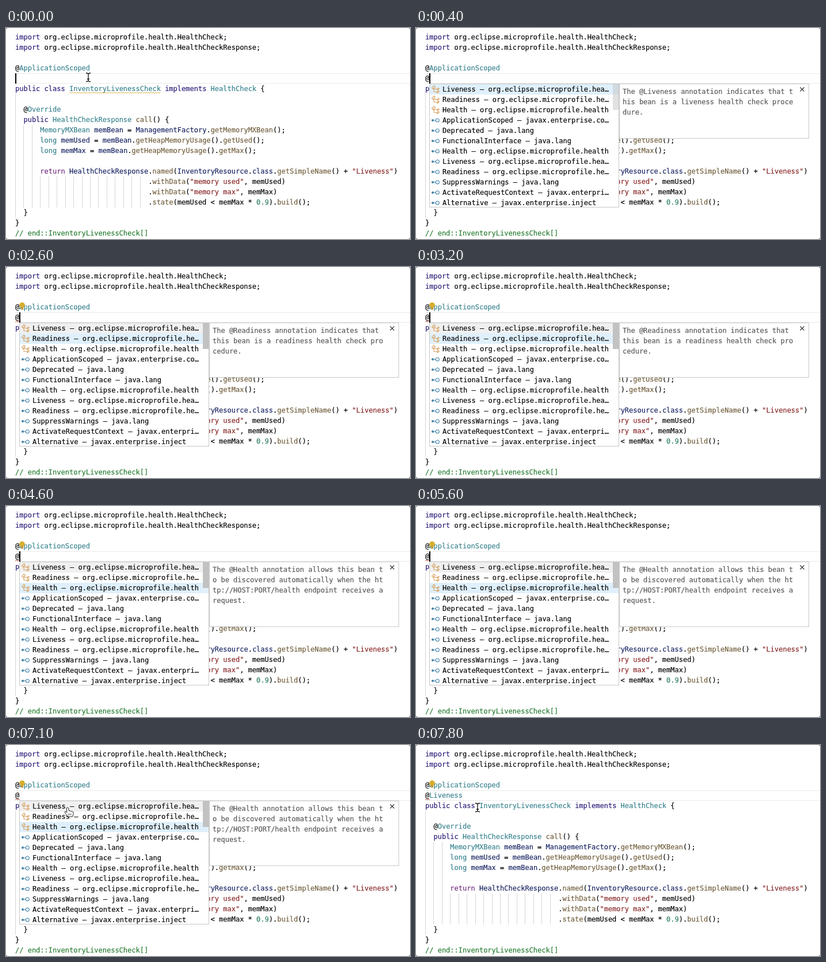
Recreate the animation shown at these times as an HTML page. Size 702 by 368 pixels, loop 7.9 s.

```html
<!DOCTYPE html>
<html lang="en">
<head>
<meta charset="utf-8">
<title>Code completion</title>
<style>
html, body { margin: 0; width: 100%; height: 100%; overflow: hidden; }
html { background: #444; }
body { position: relative; background: #fff; border-radius: 3px; color: #000;
  font: 12px/18px "DejaVu Sans Mono", "Liberation Mono", monospace; -webkit-text-stroke: .15px; }
body > *, #scroll, #close { position: absolute; }
pre { margin: 0; font: inherit; }
svg { overflow: visible; }
path, circle { fill: none; }
#line { left: 16px; right: 0; top: 79px; height: 18px; box-sizing: border-box; border: solid #e9e9e9; border-width: 1px 0; }
#code { left: 16px; top: 7px; }
#marks { left: 0; top: 0; width: 702px; height: 368px; }
#caret { top: 79px; width: 2px; height: 18px; background: #000; }
.k { color: #251a76; } .r { color: #70297f; } .t { color: #35808c; } .v { color: #14205f; }
.m { color: #6e5b38; } .s { color: #862222; } .n { color: #2f7f68; } .c { color: #217a2c; }
.box { background: #fff; border: 1px solid #c8c8c8; box-sizing: border-box; overflow: hidden; width: 330px; top: 97px; }
#list { left: 23px; height: 216px; }
#list pre { height: 18px; padding-left: 22px; position: relative; }
#list svg { position: absolute; left: 2px; top: 1px; }
#list .hover { background: #f0f0f0; }
#list .on { background: #dff0fc; }
#scroll { right: 0; top: 0; width: 10px; height: 45px; background: #c2c2c2; }
#doc { left: 353px; color: #555; }
#doc pre { margin: 4px 5px; }
#close { left: 313px; top: 5px; }
</style>
</head>
<body>
<div id="line"></div>
<pre id="code"><span class="k">import</span> org.eclipse.microprofile.health.HealthCheck;
<span class="k">import</span> org.eclipse.microprofile.health.HealthCheckResponse;

@<span class="t">ApplicationScoped</span>
<span id="typed"></span>
<span class="k">public class</span> <span class="t">InventoryLivenessCheck</span> <span class="k">implements</span> <span class="t">HealthCheck</span> {

  @<span class="t">Override</span>
  <span class="k">public</span> <span class="t">HealthCheckResponse</span> <span class="m">call</span>() {
      <span class="t">MemoryMXBean</span> <span class="v">memBean</span> = <span class="v">ManagementFactory</span>.<span class="m">getMemoryMXBean</span>();
      <span class="t">long</span> <span class="v">memUsed</span> = <span class="v">memBean</span>.<span class="m">getHeapMemoryUsage</span>().<span class="m">getUsed</span>();
      <span class="t">long</span> <span class="v">memMax</span> = <span class="v">memBean</span>.<span class="m">getHeapMemoryUsage</span>().<span class="m">getMax</span>();

      <span class="r">return</span> <span class="v">HealthCheckResponse</span>.<span class="m">named</span>(<span class="v">InventoryResource</span>.<span class="v">class</span>.<span class="m">getSimpleName</span>() + <span class="s">"Liveness"</span>)
                                .<span class="m">withData</span>(<span class="s">"memory used"</span>, memUsed)
                                .<span class="m">withData</span>(<span class="s">"memory max"</span>, memMax)
                                .<span class="m">state</span>(memUsed &lt; memMax * <span class="n">0.9</span>).<span class="m">build</span>();
  }
}
<span class="c">// end::InventoryLivenessCheck[]</span></pre>
<svg id="marks">
  <path id="guides" stroke="#d6d6d6"/>
  <path id="warning" stroke="#d9b04c"/>
  <path id="error" stroke="#cf5a52"/>
  <g id="bulb">
    <circle cx="28" cy="66.5" r="4.8" style="fill:#d8ae2e"/>
    <path d="M26 70h4v4.500h-4z" style="fill:#c09a3a"/>
  </g>
</svg>
<div id="caret"></div>
<div id="list" class="box"><div id="scroll"></div></div>
<div id="doc" class="box">
  <pre id="docText"></pre>
  <svg id="close" width="8" height="8"><path d="M.5 .5l7 7m0-7l-7 7" stroke="#333" stroke-width="1.2"/></svg>
</div>
<svg id="mouse" width="1" height="1" style="left:0;top:0">
  <g id="beam">
    <path d="M-4-7.500q4 0 4 2.500v10q0 2.500-4 2.500M4-7.500q-4 0-4 2.500m0 10q0 2.500 4 2.500" stroke="#fff" stroke-width="3"/>
    <path d="M-4-7.500q4 0 4 2.500v10q0 2.500-4 2.500M4-7.500q-4 0-4 2.500m0 10q0 2.500 4 2.500M-2 3h4" stroke="#111" stroke-width="1.300"/>
  </g>
  <g id="hand" stroke="#222" stroke-linejoin="round">
    <path d="M-2 1q2-2.500 3.500 0l1 5q2-1 3 .600 2-.900 2.700 .700 1.800-.300 1.800 1.700v2.500l-1.500 4.500h-8l-4.500-6q-1.500-2.300-.300-3 1.300-.500 3.300 1.700z" style="fill:#fff"/>
    <path d="M1.300 10.500v3m2.300-3v3m2.300-3v3" stroke-width=".8"/>
  </g>
</svg>
<script>
const LOOP = 7900, CHAR = 7.224, LEFT = 16;
const TYPE = 100, OPEN = 250, CHECKED = 1000, HOVER = 1760, ACCEPT = 7250;
const $ = id => document.getElementById(id);
const show = (id, on) => $(id).style.display = on ? '' : 'none';

const items = [
  'Liveness – org.eclipse.microprofile.hea…', 'Readiness – org.eclipse.microprofile.he…',
  'Health – org.eclipse.microprofile.health', 'ApplicationScoped – javax.enterprise.co…',
  'Deprecated – java.lang', 'FunctionalInterface – java.lang',
  'Health – org.eclipse.microprofile.health', 'Liveness – org.eclipse.microprofile.hea…',
  'Readiness – org.eclipse.microprofile.he…', 'SuppressWarnings – java.lang',
  'ActivateRequestContext – javax.enterpri…', 'Alternative – javax.enterprise.inject'];
const docs = [
  'The @Liveness annotation indicates that t\nhis bean is a liveness health check proce\ndure.',
  'The @Readiness annotation indicates that\nthis bean is a readiness health check pro\ncedure.',
  'The @Health annotation allows this bean t\no be discovered automatically when the ht\ntp://HOST:PORT/health endpoint receives a\nrequest.'];

const snippetIcon = `<path stroke="#d6a060" stroke-width="1.1" d="M1.500 5.300L5.300 1.500 7.500 3.700 3.700 7.500z
  M5 6.300V12.300H10.500M5 7.300H10.300M10.300 8.200l2.700-2.700 1.300 1.300-2.700 2.700zM10.300 13.200l2.700-2.700 1.300 1.300-2.700 2.700z"/>`;
const typeIcon = `<g stroke="#4a87ab" stroke-width="1.1"><circle cx="3" cy="8" r="1.500" style="fill:#4a87ab"/>
  <path d="M4.500 8H8.300"/><circle cx="11.300" cy="8" r="3"/></g>`;

const rows = items.map((text, i) => {
  const row = document.createElement('pre');
  row.innerHTML = `<svg width="16" height="16">${i < 3 ? snippetIcon : typeIcon}</svg>${text}`;
  $('list').insertBefore(row, $('scroll'));
  return row;
});

function squiggle(x, end, y) {
  let d = `M${x} ${y + 1}`;
  for (let up = true; x < end; up = !up) d += `L${x += 2} ${up ? y - 1 : y + 1}`;
  return d;
}
function guide(col, first, last) {
  const x = Math.round(LEFT + col * CHAR) + 0.5;
  return `M${x} ${7 + first * 18}V${25 + last * 18}`;
}
let guides = guide(0, 6, 17) + guide(2, 9, 16) + guide(4, 9, 16);
for (let col = 6; col < 32; col += 2) guides += guide(col, 14, 16);
$('guides').setAttribute('d', guides);
$('warning').setAttribute('d', squiggle(110, 268, 113));
$('error').setAttribute('d', squiggle(16, 23, 95));

const progress = (t, from, to) => Math.min(1, Math.max(0, (t - from) / (to - from)));

function drawMouse(t) {
  const down = progress(t, 1600, 1800);
  const p = progress(t, 6500, 7000), back = p * p * (3 - 2 * p);
  const x = 143 - 36 * back, y = 86 + 18 * down + 5 * back;
  const hand = t >= HOVER && t < ACCEPT;
  show('mouse', t < TYPE || t >= 1600 && t < 2100 || t >= 6500);
  show('hand', hand);
  show('beam', !hand);
  $('mouse').style.transform = `translate(${x}px,${y}px)`;
}

function draw(t) {
  const done = t >= ACCEPT, open = t >= OPEN && !done;
  const text = done ? '@Liveness' : t >= TYPE ? '@' : '';
  const chosen = t < 2100 ? 0 : t < 4400 ? 1 : 2;

  $('typed').innerHTML = text && `@<span class="t">${text.slice(1)}</span>`;
  $('caret').style.left = LEFT + text.length * CHAR - 0.5 + 'px';
  // The blink restarts on each edit.
  show('caret', (t - (done ? ACCEPT : 150)) % 1000 < 500);
  show('warning', t < CHECKED);
  show('error', t >= CHECKED);
  show('bulb', t >= CHECKED);

  show('list', open);
  show('doc', open);
  rows.forEach((row, i) => row.className = i === chosen ? 'on' : i === 0 && t >= HOVER ? 'hover' : '');
  $('scroll').style.opacity = t >= HOVER ? 1 : 1 - progress(t, OPEN, 550);
  $('docText').textContent = docs[chosen];
  $('doc').style.height = (chosen === 2 ? 114 : 96) + 'px';
  drawMouse(t);
}

const start = performance.now();
(function tick() {
  draw((performance.now() - start) % LOOP);
  requestAnimationFrame(tick);
})();
</script>
</body>
</html>
```
